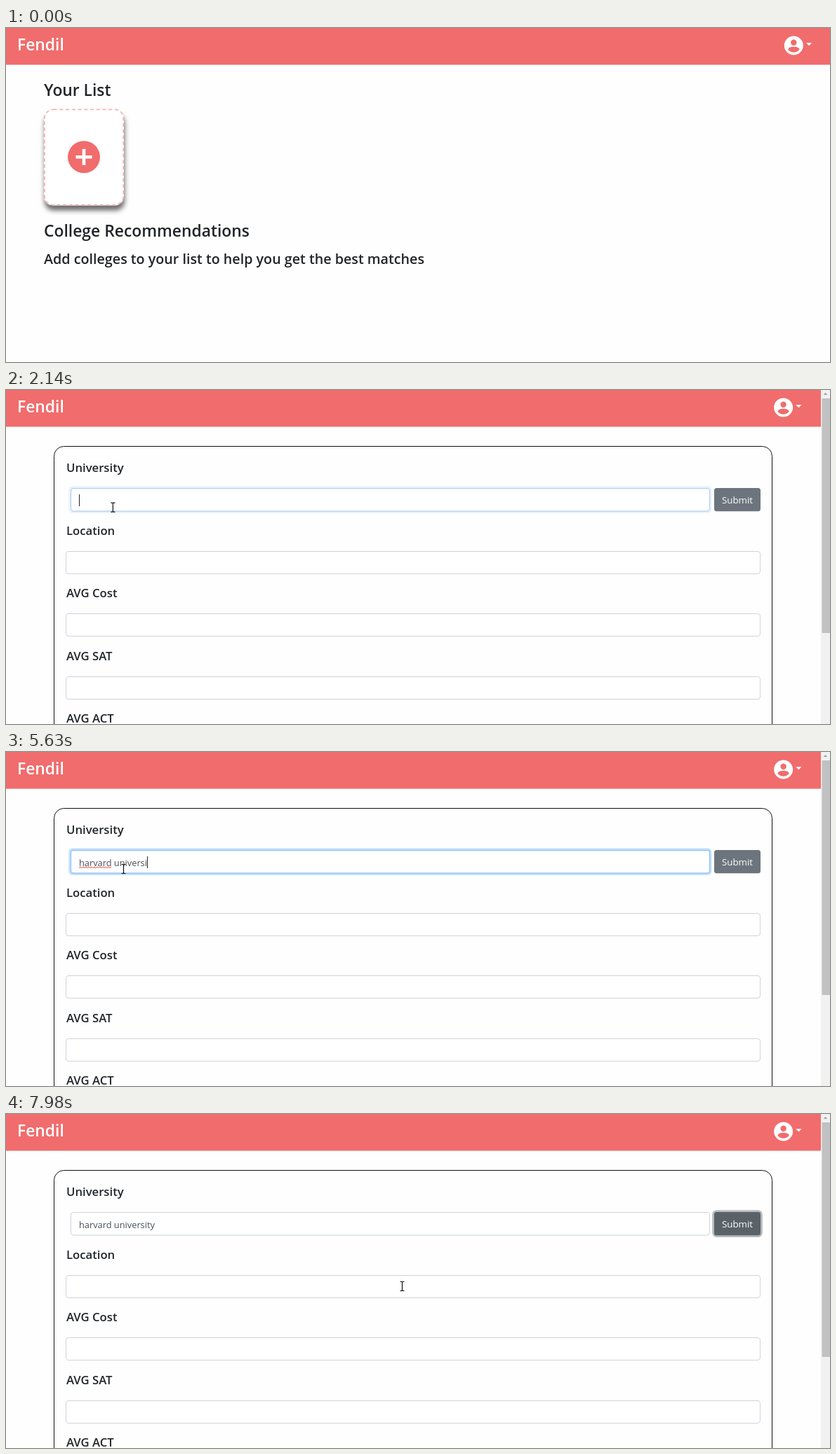
These frames come from a looping animation (1174x477 px, 8 s). An HTML page:

```html
<!DOCTYPE html>
<html lang="en">
<head>
<meta charset="utf-8">
<title>College list</title>
<style>
  html, body { margin: 0; width: 100%; height: 100%; overflow: hidden; background: #fefefe; }
  svg { display: block; width: 1174px; height: 477px; }
  text { font-family: "Open Sans", "Noto Sans", sans-serif; fill: #212529; white-space: pre; }
  .brand, .title { font-size: 22.85px; font-weight: 600; }
  .brand { fill: #fff; }
  .hint { font-size: 19.72px; font-weight: 600; }
  .label { font-size: 16.7px; font-weight: 600; }
  .typed { font-size: 12.8px; fill: #495057; }
  .submit { font-size: 13.3px; fill: #fff; text-anchor: middle; }
  .coral { fill: #f16c6c; }
  .field { fill: #fff; stroke: #ced4da; }
  .pointer { fill: #fff; stroke: #000; stroke-width: 1; stroke-linejoin: round; }
  .shadow { fill: #fff; filter: drop-shadow(1.5px 7px 3.8px rgba(0, 0, 0, .58)); }
</style>
</head>
<body>
<svg viewBox="0 0 1174 477">
  <rect width="1174" height="477" fill="#fefefe"/>
  <rect class="coral" width="1174" height="52.5"/>
  <text class="brand" x="16" y="31.5">Fendil</text>
  <g id="account" fill="#fff">
    <circle cx="1122.3" cy="25" r="13.5"/>
    <circle class="coral" cx="1122.3" cy="20.8" r="4.2"/>
    <path class="coral" d="M1114.2 30.8C1114.4 25.4 1130.2 25.4 1130.4 30.8Q1127.3 34.8 1122.3 34.8T1114.2 30.8Z"/>
    <path d="M1140 21.3h8.2l-4.1 3.9Z"/>
  </g>

  <g id="listPage">
    <text class="title" x="54" y="97">Your List</text>
    <rect class="shadow" x="54" y="115.5" width="114" height="138" rx="13"/>
    <rect id="card" x="54" y="115.5" width="114" height="138" rx="13" fill="#853f3f"/>
    <rect x="54.9" y="116.3" width="112.4" height="136.3" rx="12.5" fill="none" stroke="#f3b5b3" stroke-width="1.8" stroke-dasharray="5.25 3.5"/>
    <path class="coral" fill-rule="evenodd" d="M88 184.2a23 23 0 0 1 46 0a23 23 0 0 1-46 0Z
      M108.7 172.7h4.6v9.2h9.2v4.6h-9.2v9.2h-4.6v-9.2h-9.2v-4.6h9.2Z"/>
    <text class="title" x="54" y="298">College Recommendations</text>
    <text class="hint" x="54" y="337">Add colleges to your list to help you get the best matches</text>
  </g>

  <g id="formPage">
    <rect x="68.5" y="80.5" width="1023" height="500" rx="14" fill="#fefefe" stroke="#111"/>
    <g id="fields"></g>
    <rect id="ring" x="90.8" y="138.8" width="913" height="35.6" rx="4" fill="none" stroke="#bfdeff" stroke-width="2.8"/>
    <rect class="field" x="92.5" y="140.5" width="910" height="32.5" rx="3.5"/>
    <rect id="focusLine" x="92.5" y="140.5" width="910" height="32.5" rx="3.5" fill="none" stroke="#80bdff"/>
    <text id="typed" class="typed" x="104" y="162.6"></text>
    <path id="squiggle" fill="none" stroke="#e33" stroke-width=".9"/>
    <rect id="caret" y="149" width="1" height="17" fill="#222"/>
    <rect id="buttonRing" x="1007.6" y="138.6" width="68.8" height="36" rx="5" fill="none" stroke="#b5babe" stroke-width="2.8"/>
    <rect x="1009" y="140" width="66" height="33.3" rx="3.5" fill="#6c757d"/>
    <rect id="buttonDark" x="1009" y="140" width="66" height="33.3" rx="3.5" fill="#5a6268"/>
    <text class="submit" x="1042" y="161.8">Submit</text>
    <rect x="1161" width="13" height="477" fill="#f1f1f1"/>
    <rect x="1162.5" y="12" width="11.5" height="335" fill="#c1c1c1"/>
    <path d="M1164.8 7h5.4l-2.7-3.2Z" fill="#a3a3a3"/>
  </g>

  <g id="cursor">
    <path id="arrow" class="pointer" d="M0 0V14L3.1 11.2 5.1 15.8 7.2 14.9 5.2 10.4H9.6Z"/>
    <path id="hand" class="pointer" transform="translate(.6 -.4) scale(1.07)" d="M-1.8 1.5Q-1.8-.3 0-.3Q1.6-.3 1.6 1.5V7Q4 5.8 5 7.6Q7 6.8 8 8.6Q10.2 8.2 10.4 10V13Q10.4 15 8.8 17V19H-.2V17.2L-5 11.8Q-6.4 9.6-4.4 9Q-3.2 8.8-1.8 11Z"/>
    <path id="beam" d="M-3-6.5H-.8L0-5.8.8-6.5H3M0-6V6M-3 6.5H-.8L0 5.8.8 6.5H3" fill="none" stroke="#111" stroke-width="1.2"/>
  </g>
</svg>
<script>
const LOOP = 8000, FORM_AT = 1570, FOCUS_AT = 2080, CLICK_AT = 7210;
const el = id => document.getElementById(id);
const show = (id, on) => el(id).style.display = on ? "" : "none";
const fade = (id, t, from, to) =>
  el(id).style.opacity = Math.min(1, Math.max(0, (t - from) / (to - from)));

// Each move: number of steps, then points as [time, x, y].
const moves = [
  { steps: 11, points: [[370, 613, 461], [590, 420, 350], [810, 190, 224], [950, 122, 186], [1090, 107, 175]] },
  { steps: 7, points: [[1820, 106, 175], [2000, 142, 168], [2230, 167.5, 167]] },
  { steps: 13, points: [[6360, 170, 165], [6490, 330, 143], [6620, 590, 130], [6750, 800, 142],
                        [6880, 968, 161], [7010, 1034, 188], [7140, 1045, 165]] },
  { steps: 12, points: [[7210, 1045, 165], [7350, 1020, 171], [7560, 820, 206], [7770, 640, 238], [7980, 564.5, 246]] }
];

const typing = [
  [0, ""], [2590, "h"], [2680, "ha"], [2770, "har"], [2970, "harv"], [3060, "harva"], [3150, "harvar"],
  [3330, "harvard"], [3450, "harvard "], [3700, "harvard u"], [3880, "harvard un"], [3950, "harvard uni"],
  [4130, "harvard univ"], [4240, "harvard unive"], [4510, "harvard unives"], [5010, "harvard unive"],
  [5190, "harvard univer"], [5500, "harvard univers"], [5630, "harvard universi"],
  [5880, "harvard universit"], [5930, "harvard university"]
];

function buildForm() {
  let html = '<text class="label" x="86" y="117">University</text>';
  ["Location", "AVG Cost", "AVG SAT", "AVG ACT"].forEach((name, i) => {
    const y = 206.7 + i * 89.4;
    html += `<text class="label" x="86" y="${y}">${name}</text>
      <rect class="field" x="85.5" y="${Math.round(y + 23.3) + .5}" width="989" height="32" rx="3.5"/>`;
  });
  el("fields").innerHTML = html;
}

function drawSquiggle() {
  let d = "M104 165.6";
  for (let i = 1; i <= 23; i++) d += `L${104 + i * 2} ${i % 2 ? 164 : 165.6}`;
  el("squiggle").setAttribute("d", d);
}

function cursorAt(t) {
  const move = moves.findLast(m => t >= m.points[0][0]);
  if (!move) return null;
  const { points, steps } = move;
  const start = points[0][0], end = points.at(-1)[0];
  const step = (end - start) / (steps - 1);
  const time = Math.min(end, start + Math.floor((t - start) / step + 1e-6) * step);
  const next = Math.max(1, points.findIndex(p => p[0] >= time - 1e-6));
  const [t0, x0, y0] = points[next - 1], [t1, x1, y1] = points[next];
  const k = (time - t0) / (t1 - t0);
  return [x0 + (x1 - x0) * k, y0 + (y1 - y0) * k];
}

function pointerKind(x, y, onForm) {
  const inside = (l, t, r, b) => x >= l && x <= r && y >= t && y <= b;
  if (!onForm) return inside(54, 115, 168, 253) ? "hand" : "arrow";
  if (inside(1009, 140, 1075, 173)) return "hand";
  return inside(92, 140, 1002, 173) || inside(85, 230, 1075, 263) ? "beam" : "arrow";
}

function drawCursor(t, onForm) {
  const at = cursorAt(t);
  show("cursor", at);
  if (!at) return;
  // The pointer turns back into an arrow while it rests on the newly opened form.
  const [x, y] = at;
  const kind = pointerKind(x, y, onForm);
  ["arrow", "hand", "beam"].forEach(id => show(id, id === kind));
  el("cursor").setAttribute("transform", `translate(${x} ${y})`);
}

function drawInput(t) {
  const focused = t >= FOCUS_AT && t < CLICK_AT;
  const [typedAt, text] = typing.findLast(k => t >= k[0]);
  const typed = el("typed");
  if (typed.textContent !== text) typed.textContent = text;
  const blinkFrom = typedAt || FOCUS_AT + 20;
  show("caret", focused && Math.floor((t - blinkFrom) / 500) % 2 === 0);
  el("caret").setAttribute("x", Math.round(104 + (text ? typed.getComputedTextLength() : 0)));
  show("squiggle", focused && text.length > 7);
  for (const id of ["ring", "focusLine"]) {
    if (t < CLICK_AT) fade(id, t, FOCUS_AT, 2230);
    else fade(id, t, CLICK_AT + 150, CLICK_AT);
  }
}

function draw(t) {
  const onForm = t >= FORM_AT;
  show("listPage", !onForm);
  show("formPage", onForm);
  el("account").setAttribute("transform", `translate(${onForm ? -14.7 : 0} 0)`);
  fade("card", t, 850, 1050);
  if (onForm) drawInput(t);
  fade("buttonDark", t, 7050, 7140);
  fade("buttonRing", t, CLICK_AT, CLICK_AT + 150);
  drawCursor(t, onForm);
}

buildForm();
drawSquiggle();
const begin = performance.now();
function tick() {
  draw((performance.now() - begin) % LOOP);
  requestAnimationFrame(tick);
}
tick();
</script>
</body>
</html>
```
